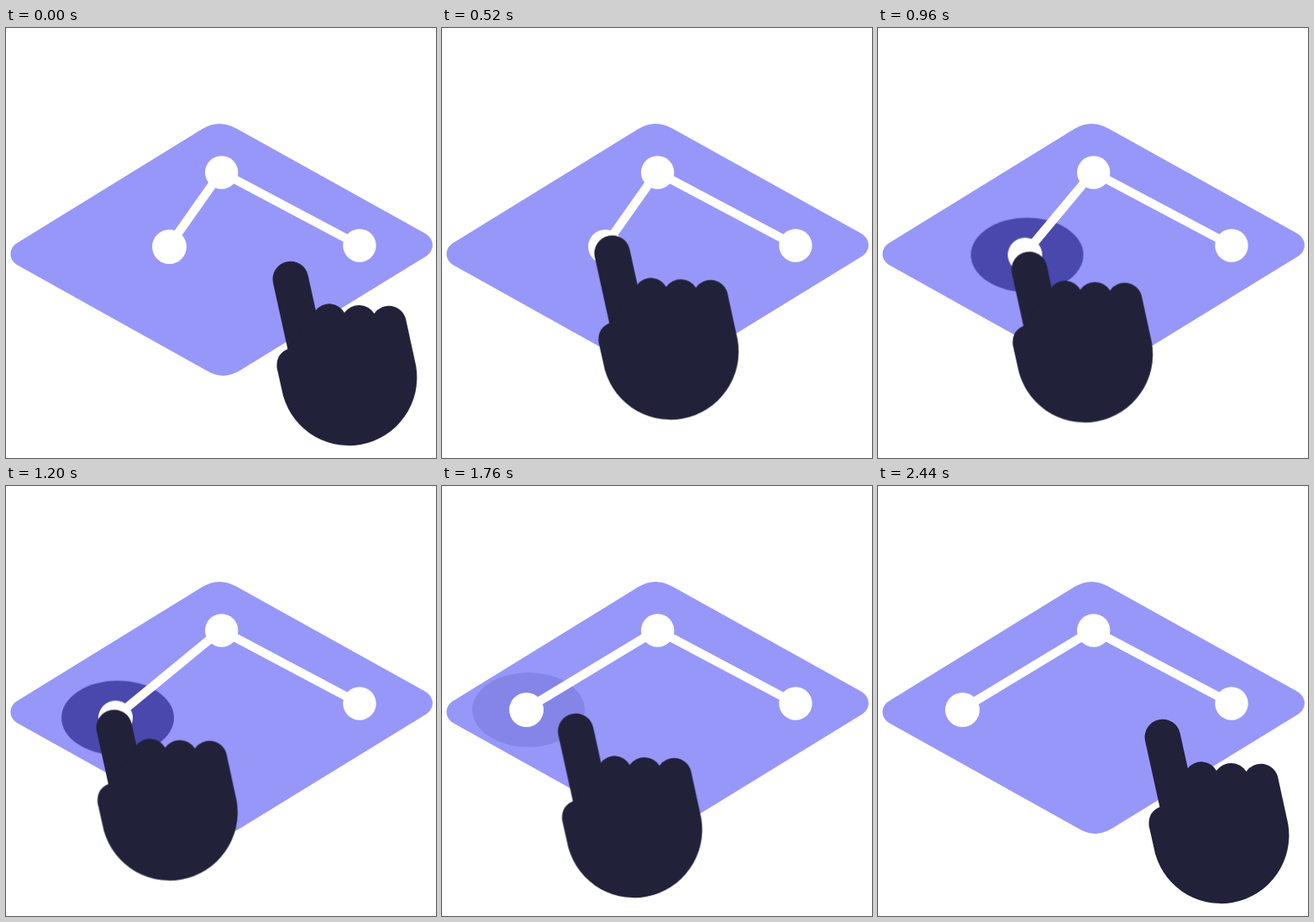
These frames come from a looping animation (512 px wide and 512 px high, 3360 ms). An HTML page without scripts:

```html
<!DOCTYPE html>
<html lang="en">
<head>
<meta charset="utf-8">
<title>Dragging a chart point</title>
<style>
  html, body { margin: 0; width: 100%; height: 100%; overflow: hidden; background: #fff; }
  svg { display: block; width: 100vw; height: 100vh; }

  .hand, .finger, .drag, .link, .halo {
    animation: 3360ms linear infinite;
  }
  .hand   { animation-name: hand; fill: #212139; }
  .finger { animation-name: press; stroke: #212139; stroke-width: 42.6; stroke-linecap: round; }
  .drag   { animation-name: drag; }
  .link   { animation-name: link; }
  .halo   { animation-name: halo; fill: #4a48ac; }
  .lines  { stroke: #fff; stroke-width: 10.4; fill: none; }

  /* approach, drag, wait, return */
  @keyframes hand {
    0%      { transform: translate(0, 0); }
    2.38%   { transform: translate(-8.4px, 1.8px); }
    4.76%   { transform: translate(-29.7px, 5px); }
    7.14%   { transform: translate(-57.6px, 5.7px); }
    9.52%   { transform: translate(-86px, 1px); }
    11.9%   { transform: translate(-113px, -10.8px); }
    14.29%  { transform: translate(-132.3px, -26.4px); }
    16.67%, 21.43% { transform: translate(-140px, -35px); }
    23.81%  { transform: translate(-143.2px, -33.6px); }
    26.19%  { transform: translate(-150.8px, -30.8px); }
    28.57%  { transform: translate(-162px, -27.5px); }
    30.95%  { transform: translate(-177.3px, -25px); }
    33.33%  { transform: translate(-194.6px, -24.6px); }
    35.71%  { transform: translate(-213.3px, -27.3px); }
    38.1%   { transform: translate(-232.6px, -33.6px); }
    40.48%, 46.43% { transform: translate(-248px, -41px); }
    48.81%  { transform: translate(-223px, -26px); }
    52.38%  { transform: translate(-180px, -7px); }
    55.95%  { transform: translate(-136px, 3px); }
    59.52%  { transform: translate(-93px, 8.8px); }
    63.1%   { transform: translate(-55px, 9.5px); }
    66.67%  { transform: translate(-26px, 6.5px); }
    69.05%  { transform: translate(-12px, 3.5px); }
    72.62%, 100% { transform: translate(0, 0); }
  }
  @keyframes press {
    0%, 16.67%, 51.19%, 100% { transform: translate(0, 0); }
    21.43%, 46.43% { transform: translate(3.5px, 16px); }
  }
  @keyframes halo {
    0%, 16.67%, 54.17%, 100% { opacity: 0; }
    21.43%, 46.43% { opacity: 1; }
  }
  @keyframes drag {
    0%, 21.43% { transform: translate(0, 0); }
    23.81%  { transform: translate(-2.8px, 1.7px); }
    26.19%  { transform: translate(-9.4px, 5.2px); }
    28.57%  { transform: translate(-19.3px, 9.6px); }
    30.95%  { transform: translate(-32.4px, 13.7px); }
    33.33%  { transform: translate(-48px, 16.2px); }
    35.71%  { transform: translate(-63.8px, 15.6px); }
    38.1%   { transform: translate(-80.6px, 11.6px); }
    40.48%, 100% { transform: translate(-94px, 6px); }
  }
  /* same travel as "drag", with the other end fixed */
  @keyframes link {
    0%, 21.43% { d: path("M194 259.7L256.4 171.2"); }
    23.81%  { d: path("M191.2 261.4L256.4 171.2"); }
    26.19%  { d: path("M184.6 264.9L256.4 171.2"); }
    28.57%  { d: path("M174.7 269.3L256.4 171.2"); }
    30.95%  { d: path("M161.6 273.4L256.4 171.2"); }
    33.33%  { d: path("M146 275.9L256.4 171.2"); }
    35.71%  { d: path("M130.2 275.3L256.4 171.2"); }
    38.1%   { d: path("M113.4 271.3L256.4 171.2"); }
    40.48%, 100% { d: path("M100 265.7L256.4 171.2"); }
  }
</style>
</head>
<body>
<svg viewBox="0 0 512 512">
  <path fill="#9797fa" d="M14 255.5L234 120Q254 108 275 120L498 244C511 251 511 265 499 272.5L279 407.5Q259 420 239 408L13 282C3 276 2.5 262 14 255.5Z"/>
  <g class="drag"><ellipse class="halo" cx="197" cy="260.5" rx="67" ry="44.3"/></g>
  <g class="lines">
    <path class="link" d="M194 259.7L256.4 171.2"/>
    <path d="M257 172L421 259"/>
  </g>
  <g fill="#fff">
    <circle class="drag" cx="194.5" cy="260.5" r="20.5"/>
    <circle cx="256.7" cy="172" r="19.7"/>
    <circle cx="421" cy="259" r="19.7"/>
  </g>
  <g class="hand">
    <path class="finger" d="M338.9 299L362 404"/>
    <path d="M336 382Q321 388 322.7 405L328.3 430A80 80 0 0 0 488.2 402L476 346A21 21 0 0 0 438.5 340A21.3 21.3 0 0 0 403 339A20.5 20.5 0 0 0 369 336Z"/>
  </g>
</svg>
</body>
</html>
```
